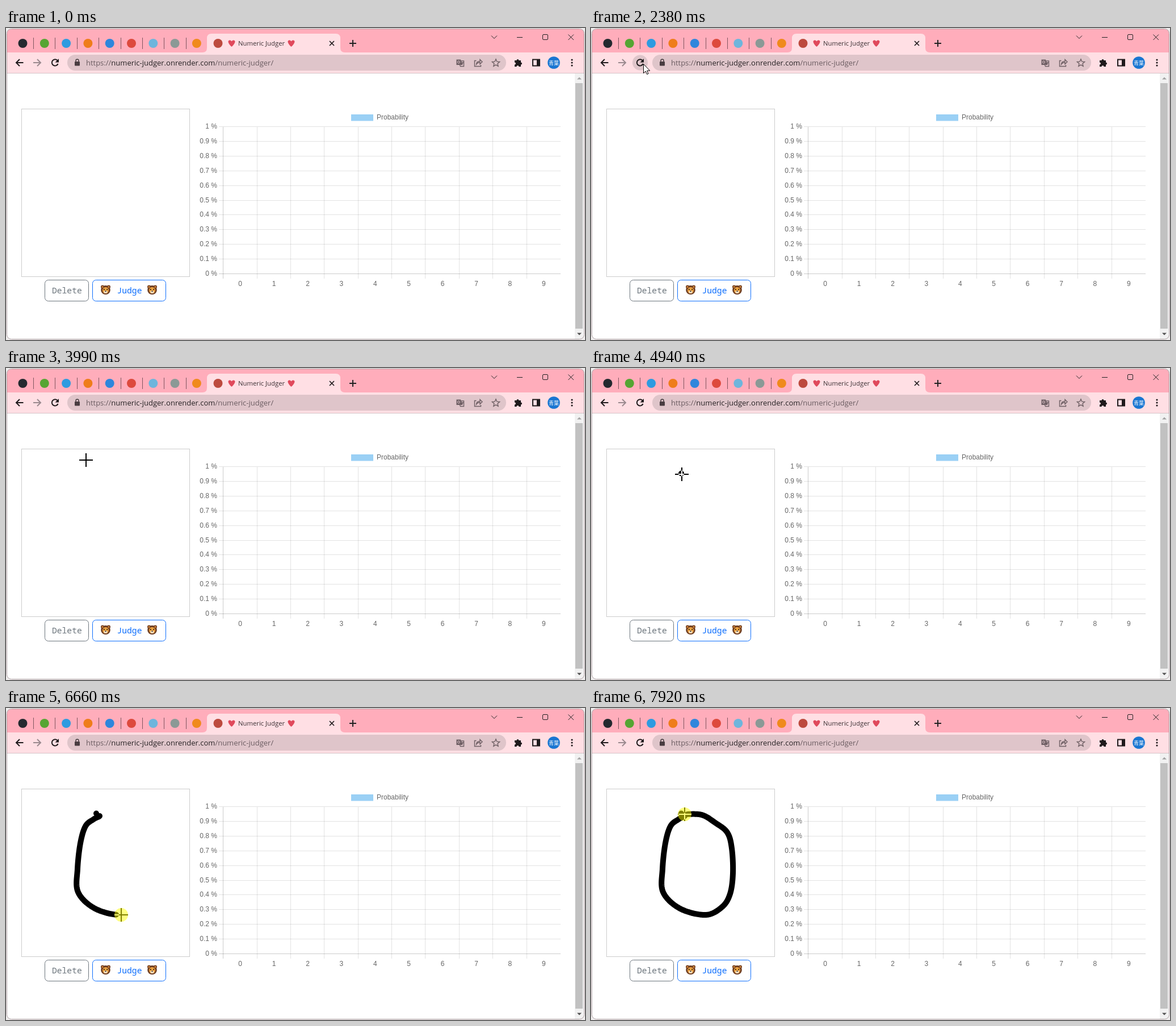
These frames come from a looping animation (1020 px wide and 549 px high, 7.99 s). An HTML page:

```html
<!DOCTYPE html>
<html lang="en">
<head>
<meta charset="utf-8">
<title>Numeric Judger</title>
<style>
html, body { margin: 0; width: 100%; height: 100%; overflow: hidden; background: #fff; }
svg { display: block; }
.ui { font-family: "Open Sans", "Noto Sans", sans-serif; }
.mono { font: 14.65px "Noto Sans Mono", monospace; }
.chart { font: 12px "Liberation Sans", Arial, sans-serif; fill: #666; }
.line { fill: none; stroke: #1f1a1c; }
.thin { fill: none; stroke: #6e5f64; stroke-width: 1.4; }
#controls { fill: none; stroke: #222; }
#plus { stroke: #222; stroke-width: 2; }
.inactive #controls { stroke: #94646d; }
.inactive #plus { stroke: #5a4046; }
#cross { fill: #fff; mix-blend-mode: difference; }
</style>
</head>
<body>
<svg id="stage" width="1020" height="549" viewBox="0 0 1020 549">
  <defs>
    <path id="heart" d="M0 6C-3 3.500-6-.5-6-3C-6-6-2-6.500 0-3.500C2-6.500 6-6 6-3C6-.5 3 3.500 0 6Z" fill="#e0495c"/>
    <g id="lion">
      <circle cx="-5.500" cy="-5.500" r="3" fill="#6d3d22"/><circle cx="5.500" cy="-5.500" r="3" fill="#6d3d22"/>
      <ellipse rx="8.300" ry="8" fill="#6d3d22"/>
      <circle cx="-5.500" cy="-5.500" r="1.500" fill="#d98a3c"/><circle cx="5.500" cy="-5.500" r="1.500" fill="#d98a3c"/>
      <ellipse cy=".5" rx="5.500" ry="5.500" fill="#eea23f"/>
      <ellipse cy="3.500" rx="3.200" ry="2.500" fill="#f6dfc0"/>
      <path d="M-1.500 1.500H1.500L0 3.500Z"/>
      <circle cx="-2.700" cy="-1" r=".9"/><circle cx="2.700" cy="-1" r=".9"/>
    </g>
  </defs>

  <rect width="1020" height="549" fill="#f0eeee"/>
  <rect x="1.500" y="1.500" width="1017" height="546" rx="8" fill="#fff"/>
  <path d="M2 80V10Q2 2 10 2H1010Q1018 2 1018 10V80Z" fill="#ffadbb"/>
  <path d="M2 43H346Q354 43 354 35V18Q354 10 362 10H581Q589 10 589 18V35Q589 43 597 43H1018V79H2Z" fill="#ffdfe4"/>
  <path d="M2 79.500H1018" stroke="#d6c3c7"/>

  <!-- pinned tabs -->
  <g id="tabs"></g>
  <circle id="favicon" cx="373.500" cy="27" r="8" fill="#bd4a3e"/>
  <path id="spinner" d="M373.500 20A7 7 0 1 1 366.500 27" fill="none" stroke="#3b78c8" stroke-width="2"/>
  <use href="#heart" x="397.500" y="27"/><use href="#heart" x="502.500" y="27"/>
  <text class="ui" x="409" y="31" font-size="11.300" fill="#3a3034">Numeric Judger</text>
  <path class="line" d="M570 23L578 31M578 23L570 31" stroke-width="1.700"/>
  <path id="plus" d="M605 27H617M611 21V33"/>
  <g id="controls">
    <path d="M855 13.500L860 18.500L865 13.500M900 16.500H910M990.500 11.500L1000 21M1000 11.500L990.500 21"/>
    <rect x="945.500" y="11.500" width="9" height="9" rx="1.500"/>
  </g>

  <!-- toolbar -->
  <path class="line" d="M30.500 61H18M24 55L18 61L24 67" stroke-width="2"/>
  <path d="M48 61H60.500M55 55L61 61L55 67" fill="none" stroke="#9b8a8f" stroke-width="2"/>
  <circle id="hover" cx="86.500" cy="61" r="13.500" fill="#dfc5ca"/>
  <g id="reload">
    <path class="line" d="M90.500 57A5.600 5.600 0 1 0 91.600 63" stroke-width="2"/>
    <path d="M93 54V60.500H86.500Z" fill="#1f1a1c"/>
  </g>
  <path id="stop" class="line" d="M81.500 56L91.500 66M91.500 56L81.500 66" stroke-width="2"/>
  <rect x="108" y="47" width="773" height="28" rx="14" fill="#dfc5ca"/>
  <rect x="121" y="59" width="9" height="7.500" rx="1" fill="#483d41"/>
  <path d="M123 59V57.500A2.500 2.500 0 0 1 128 57.500V59" fill="none" stroke="#483d41" stroke-width="1.500"/>
  <text class="ui" x="141" y="65.500" font-size="13" fill="#6b5c61">https://<tspan fill="#272224">numeric-judger.onrender.com</tspan>/numeric-judger/</text>
  <g id="translate">
    <path d="M793.500 55.500H801L804.500 65H793.500Z" fill="#6e5f64"/>
    <path class="thin" d="M802 58H806.500V67.500H800.500L799.500 65M803 61H806M804.500 60V61Q804 63 803 64" stroke-width="1"/>
    <circle cx="797.500" cy="60" r="2" fill="none" stroke="#dfc5ca"/>
  </g>
  <path class="thin" d="M828.500 57.500H825.500V67.500H836.500V65M828.500 64Q829 58.500 835 58.500V55.500L839 59.500L835 63.500V60.500Q831 60.500 828.500 64Z"/>
  <path class="thin" d="M863 54.800L864.900 59.200L869.600 59.600L866 62.700L867.100 67.300L863 64.800L858.900 67.300L860 62.700L856.400 59.600L861.100 59.200Z"/>
  <path d="M896 57H899.500A2 2 0 1 1 903.500 57H907V60.500A2 2 0 1 1 907 64.500V68H903.500A2 2 0 1 0 899.500 68H896V64.500A2 2 0 1 0 896 60.500Z" fill="#1f1a1c"/>
  <rect class="line" x="928" y="55.500" width="12" height="11" stroke-width="2"/>
  <path d="M935 55H940V67H935Z" fill="#1f1a1c"/>
  <circle cx="965" cy="61" r="10.800" fill="#1976d2"/>
  <text x="965" y="64.500" font-family="'Noto Sans CJK JP', 'Noto Sans CJK', sans-serif" font-size="9" fill="#fff" text-anchor="middle">青葉</text>
  <path d="M997 56v.01M997 61v.01M997 66v.01" stroke="#1f1a1c" stroke-width="3.200" stroke-linecap="round"/>

  <!-- page -->
  <rect x="1002" y="80" width="15" height="467" fill="#f1f1f1"/>
  <rect x="1003" y="97" width="13" height="432" fill="#c1c1c1"/>
  <path d="M1006 90.500H1014L1010 86.500Z" fill="#a3a3a3"/>
  <path d="M1006 536.500H1014L1010 540.500Z" fill="#505050"/>
  <rect x="27.500" y="142.500" width="296" height="295" fill="#fff" stroke="#ccc"/>
  <rect x="68.500" y="443.500" width="77" height="37" rx="6" fill="#fff" stroke="#6c757d"/>
  <text class="mono" x="81" y="467" fill="#6c757d">Delete</text>
  <rect x="152.500" y="443.500" width="129" height="37" rx="6" fill="#fff" stroke="#0d6efd"/>
  <text class="mono" x="195.500" y="467" fill="#0d6efd">Judge</text>
  <use href="#lion" x="175.500" y="461"/><use href="#lion" x="257.500" y="461"/>
  <g id="chart" class="chart">
    <rect x="608" y="152" width="39" height="11.500" fill="#9ad0f5"/>
    <text x="653" y="161">Probability</text>
  </g>
  <rect x="1.500" y="1.500" width="1017" height="546" rx="8" fill="none" stroke="#ab9da0"/>

  <!-- drawing and pointer -->
  <circle id="dot" cx="159" cy="185.500" r="5"/>
  <polyline id="ink" fill="none" stroke="#000" stroke-width="10" stroke-linecap="round" stroke-linejoin="round"/>
  <path id="cross" d="M-12-1H-1V-12H1V-1H12V1H1V12H-1V1H-12Z"/>
  <path id="arrow" d="M.5.5V16.500L4.200 13L6.600 18.500L9 17.500L6.700 12.100H11.700Z" fill="#fff" stroke="#000"/>
  <circle id="press" r="12" fill="#ff0" fill-opacity=".5"/>
</svg>
<script>
const LOOP = 7990;
const $ = id => document.getElementById(id);
const stage = $('stage');

function add(parent, tag, attrs, text) {
  const el = document.createElementNS('http://www.w3.org/2000/svg', tag);
  for (const k in attrs) el.setAttribute(k, attrs[k]);
  if (text) el.textContent = text;
  $(parent).append(el);
}

['#24292f', '#55a532', '#2d9be0', '#ef7d1a', '#2f86dc', '#dd4a3d', '#6db5dc', '#8b9996', '#f08a1c'].forEach((fill, i) => {
  add('tabs', 'circle', { cx: 29.5 + i * 38.3, cy: 27, r: 8, fill });
  if (i < 8) add('tabs', 'path', { d: `M${Math.round(48 + i * 38.4)}.5 17V37`, stroke: '#805660' });
});

// chart grid with tick labels
const gridLine = (d, axis) => add('chart', 'path', { d, stroke: '#000', 'stroke-opacity': axis ? .2 : .11 });
for (let i = 0; i <= 10; i++) {
  const y = Math.floor(173.5 + 25.9 * i) + .5;
  gridLine(`M375 ${y}H977`, i == 10);
  add('chart', 'text', { x: 372, y: Math.round(177 + 25.9 * i), 'text-anchor': 'end' }, (10 - i) / 10 + ' %');
  if (i == 10) break;
  gridLine(`M${Math.floor(382.7 + 59.37 * i) + .5} 174V441`, i == 0);
  add('chart', 'text', { x: 412.7 + 59.4 * i, y: 454, 'text-anchor': 'middle' }, String(i));
}

// pointer moves: each glides through evenly timed points, then rests
const moves = [
  { start: 780, step: 370, points: [[513, 537], [306, 317], [127, 126], [92, 63]] },
  { start: 3220, step: 353, points: [[92, 63], [110, 108], [141, 162], [159, 185]] },
  { start: 4540, step: 400, points: [[159, 186], [160, 187], [165, 190]] },
  { start: 5550, step: 158, points: [
    [164, 191], [154, 196], [140, 208], [131, 238], [126, 283], [127, 324], [157, 353], [202, 364],
    [231, 350], [245, 327], [250, 291], [248, 247], [240, 219], [219, 202], [195, 188], [165, 187]
  ] }
];
const DRAW = 5350, LAG = 35;

// Catmull-Rom curve through the points of the current move
function at(t) {
  const { start, step, points } = moves.findLast(m => m.start <= t) || moves[0];
  const last = points.length - 1;
  const u = Math.max(0, Math.min(last, (t - start) / step));
  const i = Math.min(last - 1, Math.floor(u)), k = u - i;
  const [a, b, c, d] = [i - 1, i, i + 1, i + 2].map(n => points[Math.max(0, Math.min(last, n))]);
  return [0, 1].map(n => b[n] + k / 2 * (c[n] - a[n]
    + k * (2 * a[n] - 5 * b[n] + 4 * c[n] - d[n] + k * (3 * (b[n] - c[n]) + d[n] - a[n]))));
}

function snap(t) {
  const origin = t < 4540 ? 780 : 5540;
  return origin + Math.floor((t - origin) / 70) * 70;
}

const show = (id, on) => $(id).style.display = on ? '' : 'none';
const within = (t, a, b) => t >= a && t < b;

function draw(time) {
  const t = time % LOOP, s = snap(t);
  const [x, y] = at(s).map(Math.round);
  const onPad = x >= 28 && x <= 323 && y >= 141 && y <= 437;
  const loading = within(t, 2450, 3150);

  stage.classList.toggle('inactive', within(t, 250, 2310));
  show('hover', within(t, 1830, 3360));
  show('favicon', !within(t, 2450, 3360));
  show('spinner', loading);
  $('spinner').setAttribute('transform', `rotate(${s * .36} 373.5 27)`);
  show('reload', !loading);
  show('stop', loading);
  show('translate', !loading);

  show('cross', t >= 780 && onPad);
  show('arrow', t >= 780 && !onPad);
  show('press', within(t, 4490, 4940) || t >= DRAW);
  for (const id of ['cross', 'arrow', 'press']) $(id).setAttribute('transform', `translate(${x} ${y})`);

  show('dot', t >= 4540);
  const tip = s - LAG, trail = [];
  for (let p = DRAW; p <= tip; p += 5) trail.push(at(p));
  $('ink').setAttribute('points', trail.join(' '));
}

const begin = performance.now();
function tick() {
  draw(performance.now() - begin);
  requestAnimationFrame(tick);
}
tick();
</script>
</body>
</html>
```
